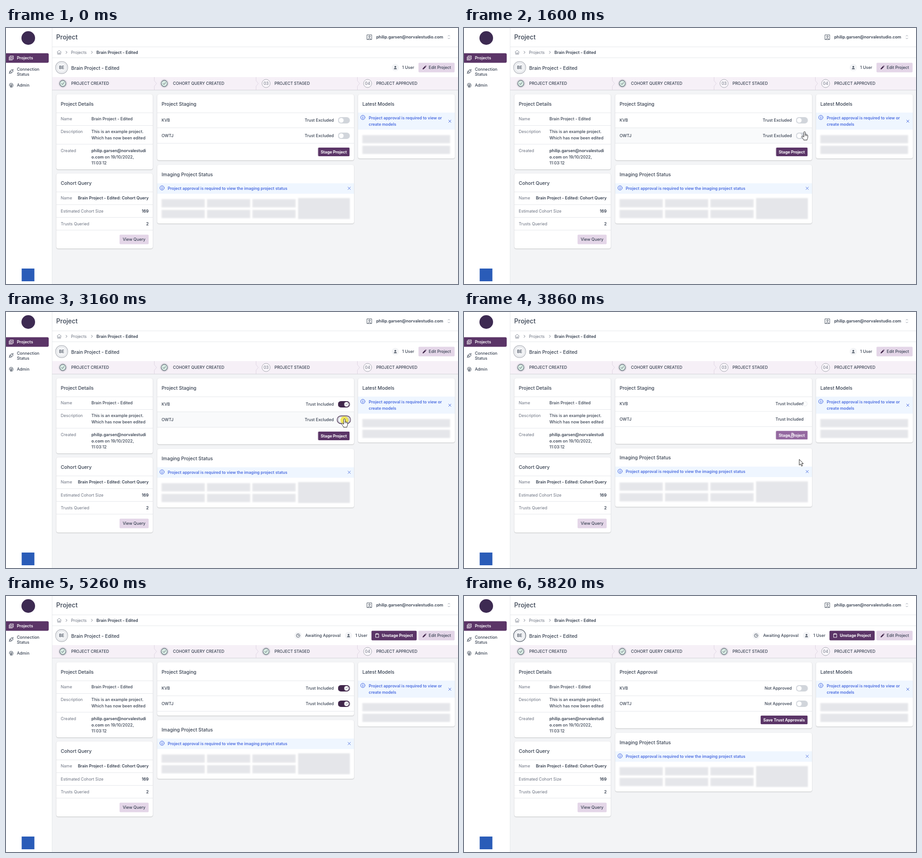
An HTML page that plays this animation: 995 px wide and 563 px high, repeating every 7740 ms.

```html
<!DOCTYPE html>
<html lang="en">
<head>
<meta charset="utf-8">
<title>Project</title>
<style>
html, body { margin: 0; width: 100%; height: 100%; overflow: hidden; background: #f3f4f6; }
#stage { position: relative; width: 995px; height: 563px; overflow: hidden; }
svg { position: absolute; left: 0; top: 0; display: block; }
text { font: 500 9px Inter, "Liberation Sans", sans-serif; fill: #374151; }
.h { font-size: 10.5px; }
.b { font-weight: 600; }
.g { fill: #6b7280; font-weight: 400; }
.step { font-size: 8.8px; }
.info { font-weight: 600; font-size: 8.85px; fill: #4a6ce0; }
.w { font-weight: 700; font-size: 8.8px; fill: #fff; }
.e { text-anchor: end; }
.m { text-anchor: middle; }
.line { stroke: #e5e7eb; fill: none; }
.ico { fill: none; stroke: #4b5563; stroke-linecap: round; stroke-linejoin: round; }
.bone { fill: #e5e6ea; filter: blur(1.5px); }
.main { fill: #5b3567; }
.soft { fill: #e4d6e8; }
.tint { fill: #eff6ff; }

.card { position: absolute; overflow: hidden; background: #fff; border-radius: 4px;
  box-shadow: 0 1px 2px rgba(0, 0, 0, .2), 0 0 1px rgba(0, 0, 0, .12); }

/* one timeline of 7.74 s for everything */
.t { animation: 7.74s step-end infinite; }
.slide { animation: 7.74s linear infinite; }

#staging { animation-name: fold; }
@keyframes fold {
  0%, 47.15% { height: 145px; }
  47.16%, 62.5% { height: 143.5px; }
  62.53% { height: 145px; animation-timing-function: ease-in-out; }
  66.54%, 68.2% { height: 117px; animation-timing-function: ease-in-out; }
  70.5%, 71% { height: 0; animation-timing-function: ease-in-out; }
  75.15%, 100% { height: 145px; }
}
#imaging { animation-name: follow; }
@keyframes follow {
  0%, 47.15% { transform: none; }
  47.16%, 62.5% { transform: translateY(-1.5px); }
  62.53% { transform: none; animation-timing-function: ease-in-out; }
  66.54%, 68.2% { transform: translateY(-28px); animation-timing-function: ease-in-out; }
  70.5%, 71% { transform: translateY(-145px); animation-timing-function: ease-in-out; }
  75.15%, 100% { transform: none; }
}

/* rows shrink a little while saving */
.nudge { animation-name: nudge; }
@keyframes nudge {
  0% { transform: none; }
  47.16% { transform: translateY(var(--d)); }
  62.53%, 100% { transform: none; }
}
.shift { animation-name: shift; }
@keyframes shift {
  0% { transform: none; }
  47.16% { transform: translateX(26px); }
  62.53%, 100% { transform: none; }
}
.idle { animation-name: idle; }
@keyframes idle { 0% { opacity: 1; } 47.16% { opacity: 0; } 62.53%, 100% { opacity: 1; } }
.busy { animation-name: busy; }
@keyframes busy { 0% { opacity: 0; } 47.16% { opacity: 1; } 62.53%, 100% { opacity: 0; } }
.spin { animation: spin .9675s linear infinite; }
@keyframes spin { to { transform: rotate(360deg); } }

/* before and after the approval card takes over */
.early { animation-name: early; }
@keyframes early { 0% { opacity: 1; } 70.6%, 100% { opacity: 0; } }
.late { animation-name: late; }
@keyframes late { 0% { opacity: 0; } 70.6%, 100% { opacity: 1; } }
/* before and after the project is staged */
.open { animation-name: open; }
@keyframes open { 0% { opacity: 1; } 62.53%, 100% { opacity: 0; } }
.staged { animation-name: staged; }
@keyframes staged { 0% { opacity: 0; } 62.53%, 100% { opacity: 1; } }

.out1 { animation-name: out1; }
@keyframes out1 { 0% { opacity: 1; } 33.72%, 100% { opacity: 0; } }
.in1 { animation-name: in1; }
@keyframes in1 { 0% { opacity: 0; } 33.72% { opacity: 1; } 70.6%, 100% { opacity: 0; } }
.out2 { animation-name: out2; }
@keyframes out2 { 0% { opacity: 1; } 41.73%, 100% { opacity: 0; } }
.in2 { animation-name: in2; }
@keyframes in2 { 0% { opacity: 0; } 41.73% { opacity: 1; } 70.6%, 100% { opacity: 0; } }

.track { fill: #d1d5db; }
.knob1 { animation-name: knob1; }
@keyframes knob1 {
  0%, 33.72% { transform: none; }
  35.5%, 70.5% { transform: translateX(11.5px); }
  70.6%, 100% { transform: none; }
}
.knob2 { animation-name: knob2; }
@keyframes knob2 {
  0%, 41.73% { transform: none; }
  43.5%, 70.5% { transform: translateX(11.5px); }
  70.6%, 100% { transform: none; }
}
.ring { fill: none; stroke: #40264a; stroke-width: 1.4; }
.ring1 { animation-name: ring1; }
@keyframes ring1 { 0% { opacity: 0; } 32.8% { opacity: 1; } 40.7%, 100% { opacity: 0; } }
.ring2 { animation-name: ring2; }
@keyframes ring2 { 0% { opacity: 0; } 40.7% { opacity: 1; } 45.35%, 100% { opacity: 0; } }
.hover { fill: #f9fafb; }
.hover1 { animation-name: hover1; }
@keyframes hover1 { 0% { opacity: 0; } 24.2% { opacity: 1; } 36.6%, 100% { opacity: 0; } }
.hover2 { animation-name: hover2; }
@keyframes hover2 {
  0% { opacity: 0; } 18.4% { opacity: 1; } 24.2% { opacity: 0; }
  36.6% { opacity: 1; } 44%, 100% { opacity: 0; }
}
.focus { animation-name: focus; }
@keyframes focus { 0% { stroke: #a9adb5; } 68.86%, 100% { stroke: #4b5563; } }

#cursor { animation-name: move; }
@keyframes move {
  0% { transform: translate(896px, 575px); }
  6.72% { transform: translate(896px, 575px); animation-timing-function: steps(6, start); }
  11.9% { transform: translate(812px, 366px); animation-timing-function: steps(5, start); }
  16.28% { transform: translate(759px, 264px); }
  17.18% { transform: translate(759px, 264px); animation-timing-function: steps(4, start); }
  20.65% { transform: translate(750px, 232px); animation-timing-function: steps(6, start); }
  26.61% { transform: translate(748px, 208px); }
  27.65% { transform: translate(748px, 208px); animation-timing-function: steps(2, start); }
  29.33% { transform: translate(744px, 202px); }
  35.3% { transform: translate(744px, 202px); animation-timing-function: steps(4, start); }
  38.89% { transform: translate(745px, 235px); }
  43% { transform: translate(745px, 235px); animation-timing-function: steps(3, start); }
  45.35% { transform: translate(722px, 270px); }
  47.9% { transform: translate(722px, 270px); animation-timing-function: steps(2, start); }
  49.85% { transform: translate(738px, 324px); animation-timing-function: step-end; }
  50.78% { transform: translate(767px, 352px); animation-timing-function: step-end; }
  51.68% { transform: translate(792px, 386px); animation-timing-function: steps(5, start); }
  56.1%, 100% { transform: translate(947px, 575px); }
}
.hand { animation-name: hand; }
@keyframes hand { 0% { opacity: 0; } 19.1% { opacity: 1; } 47.16%, 100% { opacity: 0; } }
.arrow { animation-name: arrow; }
@keyframes arrow { 0% { opacity: 1; } 19.1% { opacity: 0; } 47.16%, 100% { opacity: 1; } }
.click { animation-name: click; }
@keyframes click {
  0% { opacity: 0; } 32.8% { opacity: .8; } 34.6% { opacity: 0; }
  40.75% { opacity: .8; } 42.5% { opacity: 0; }
  45.35% { opacity: .8; } 46.9%, 100% { opacity: 0; }
}
</style>
</head>
<body>
<div id="stage">

<svg width="995" height="563">
  <defs>
    <g id="note" class="ico" style="stroke:#4a6ce0">
      <circle r="4.8" fill="#dbe6ff"/><path d="M0-.4V2.5M0-2.4V-2.2"/>
    </g>
    <path id="close" d="M-3-3L3 3M3-3L-3 3" fill="none" stroke="#4a6ce0"/>
    <g id="done">
      <circle r="9" fill="#f3f1f5" stroke="#cfcad4"/>
      <circle r="6.8" fill="#d8ebe3" stroke="#596270" stroke-width="1.2"/>
      <path class="ico" d="M-2.8.2L-.8 2.2 3-2.2"/>
    </g>
    <g id="person">
      <circle r="8" fill="#f3f4f6"/>
      <circle cy="-1.6" r="1.8" fill="#4b5563"/><path d="M-3.2 3.4C-3.2.2 3.2.2 3.2 3.4Z" fill="#4b5563"/>
    </g>
    <path id="split" d="M0 108V116L5 122 0 128V136" fill="none" stroke="#dfd6e3"/>
    <path id="arc" d="M0-5A5 5 0 1 1-5 0" fill="none" stroke-width="1.5" stroke-linecap="round"/>
  </defs>

  <rect width="101" height="563" fill="#fff"/>
  <rect x="101" width="894" height="108" fill="#fff"/>
  <rect x="101" y="108" width="894" height="28" fill="#f6f0f7"/>
  <path class="line" d="M101.5 0V563M101 41.5H995M101 65.5H995"/>
  <path d="M101 136.5H995" stroke="#d4d5da"/>

  <circle cx="49" cy="22" r="15" fill="#3d2a52"/>
  <rect x="34.5" y="529" width="28" height="28" fill="#2a5cb8"/>
  <path class="main" d="M0 55.5H91Q94 55.5 94 58.5V73.5Q94 76.5 91 76.5H0Z"/>
  <g class="ico" stroke-width="1.1">
    <path style="stroke:#fff" d="M9 61.5H16V68.5H9ZM7 63.5V70.5H14M10.8 64H14.2M10.8 66H14.2"/>
    <path d="M7 100L9 98M14 93L16 91M9.3 94.5L13 98.2C11.3 100 9.5 99.8 8.5 98.8 7.5 97.6 7.6 96 9.3 94.5ZM10.5 93.2C12 91.8 13.6 92 14.6 93 15.6 94 15.7 95.7 14.2 97"/>
    <path d="M7.5 127C7 123 9 121.5 11.5 121.5S16 123.5 15.5 128M9.2 129.5C10.5 127 8.8 124 11.5 124S13 128 12 130.5M11.5 126C11.5 128 11 129 10.5 130.5M14 130.2L14.4 129"/>
  </g>
  <text class="b" x="24" y="69" style="fill:#fff">Projects</text>
  <text x="24" y="94">Connection</text>
  <text x="24" y="105">Status</text>
  <text x="24" y="129">Admin</text>

  <text x="110.5" y="25" style="font-size:14px">Project</text>
  <g class="ico">
    <rect x="795" y="15" width="10" height="10.5"/><circle cx="800" cy="18.8" r="1.7"/><path d="M797 25C797 21.5 803 21.5 803 25"/>
    <path style="stroke:#9ca3af" d="M973 18L975 16 977 18M973 22L975 24 977 22"/>
    <path style="stroke:#8b919c" d="M112.5 53L117 49 121.5 53M113.5 52.5V57.5H120.5V52.5M116 57V54.5H118V57"/>
    <path style="stroke:#6b7280" d="M132 51L134.4 53.5 132 56M188 51L190.4 53.5 188 56"/>
  </g>
  <text class="b" x="815" y="23">philip.garsen@norvalestudio.com</text>
  <text class="g" x="143" y="56.5">Projects</text>
  <text class="b" x="199" y="56.5">Brain Project - Edited</text>

  <circle class="t focus" cx="122.5" cy="87" r="13.4" fill="#fff" stroke-width="1.2"/>
  <circle cx="122.5" cy="87" r="11" fill="#f3f4f6" stroke="#d1d5db"/>
  <text class="m" x="122.5" y="90.2">BE</text>
  <text class="h" x="143.5" y="91.5">Brain Project - Edited</text>

  <g class="t open">
    <use href="#person" x="857" y="87"/>
    <text x="872" y="90.2">1 User</text>
  </g>
  <g class="t staged">
    <circle cx="643" cy="87" r="8" fill="#f3f4f6"/>
    <g class="ico"><circle cx="643" cy="87" r="3.8"/><path d="M643 84.8V87.2H644.8"/></g>
    <text x="658.5" y="90.2">Awaiting Approval</text>
    <use href="#person" x="754" y="87"/>
    <text x="769" y="90.2">1 User</text>
    <rect class="main" x="804.5" y="76.5" width="99.5" height="21" rx="2"/>
    <path class="ico" style="stroke:#fff" d="M815 83.5H813.5V91H820.5V83.5H819M815.2 82.5H818.8V84.5H815.2Z"/>
    <text class="w m" x="861.5" y="90.2">Unstage Project</text>
  </g>
  <rect class="soft" x="908" y="76.5" width="79.5" height="21" rx="2"/>
  <path d="M917 91L917.6 88.5 922.6 83.5 924.5 85.4 919.5 90.4ZM923.2 82.9L924 82.2 925.8 84 925.1 84.8Z" fill="#40264a"/>
  <text class="m" x="955" y="90.2">Edit Project</text>

  <use href="#split" x="326.5"/><use href="#split" x="550.5"/><use href="#split" x="773.5"/>
  <use href="#done" x="125" y="122"/><use href="#done" x="348.5" y="122"/>
  <g class="t open">
    <circle cx="572.5" cy="122" r="9" fill="#faf7fb" stroke="#a4a6ae"/>
    <text class="g m" x="572.5" y="125.2">03</text>
  </g>
  <use class="t staged" href="#done" x="572.5" y="122"/>
  <circle cx="796" cy="122" r="9" fill="#faf7fb" stroke="#a4a6ae"/>
  <text class="g m" x="796" y="125.2">04</text>
  <text class="step" x="143.5" y="125.2">PROJECT CREATED</text>
  <text class="step" x="367.5" y="125.2">COHORT QUERY CREATED</text>
  <text class="step" x="591" y="125.2">PROJECT STAGED</text>
  <text class="step" x="815" y="125.2">PROJECT APPROVED</text>
</svg>

<div class="card" style="left:110.5px;top:146px;width:212.5px;height:165px">
  <svg width="212.5" height="165" viewBox="110.5 146 212.5 165">
    <path class="line" d="M110 186.5H324M110 214.5H324M110 255.5H324"/>
    <text class="h" x="120" y="170.5">Project Details</text>
    <text class="g" x="120" y="203.2">Name</text>
    <text x="187.5" y="203.2">Brain Project - Edited</text>
    <text class="g" x="120" y="231.2">Description</text>
    <text x="187.5" y="231.2">This is an example project.</text>
    <text x="187.5" y="244.8">Which has now been edited</text>
    <text class="g" x="120" y="272.7">Created</text>
    <text class="b" x="187.5" y="272.7">philip.garsen@norvalestudi</text>
    <text x="187.5" y="286.5"><tspan class="b">o.com</tspan> on 19/10/2022,</text>
    <text x="187.5" y="300.2">11:03:12</text>
  </svg>
</div>

<div class="card" style="left:110.5px;top:320px;width:212.5px;height:165px">
  <svg width="212.5" height="165" viewBox="110.5 320 212.5 165">
    <path class="line" d="M110 360.5H324M110 388.5H324M110 416.5H324M110 444.5H324"/>
    <text class="h" x="120" y="344.5">Cohort Query</text>
    <text class="g" x="120" y="377.2">Name</text>
    <text class="b e" x="313.5" y="377.2">Brain Project - Edited: Cohort Query</text>
    <text class="g" x="120" y="405.5">Estimated Cohort Size</text>
    <text class="b e" x="313.5" y="405.5">169</text>
    <text class="g" x="120" y="433.5">Trusts Queried</text>
    <text class="b e" x="313.5" y="433.5">2</text>
    <rect class="soft" x="249.5" y="454.5" width="64" height="21" rx="2"/>
    <text class="m" x="281.5" y="468.2">View Query</text>
  </svg>
</div>

<div class="card slide" id="staging" style="left:332.5px;top:146px;width:433px">
  <svg width="433" height="145" viewBox="332.5 146 433 145">
    <rect class="hover t hover1" x="332" y="187" width="434" height="32"/>
    <rect class="hover t hover2" x="332" y="220" width="434" height="33"/>
    <path class="line" d="M332 186.5H766"/>
    <text class="h t early" x="342" y="170.5">Project Staging</text>
    <text class="h t late" x="342" y="170.5">Project Approval</text>

    <g class="t nudge" style="--d:-.75px">
      <path class="line" d="M332 219.5H766"/>
      <text x="342" y="206.2">KVB</text>
      <g class="t shift">
        <text class="e t out1" x="721" y="206.2">Trust Excluded</text>
        <text class="e t in1" x="721" y="206.2">Trust Included</text>
        <text class="e t late" x="721" y="206.2">Not Approved</text>
      </g>
      <g class="t idle">
        <rect class="track" x="730" y="196" width="26.5" height="14" rx="7"/>
        <rect class="t in1" x="730" y="196" width="26.5" height="14" rx="7" fill="#40264a"/>
        <g class="slide knob1">
          <circle cx="737.5" cy="203" r="5.2" fill="#fff"/>
          <path class="ico t in1" d="M735.6 203.2L736.9 204.5 739.4 201.6"/>
        </g>
        <rect class="ring t ring1" x="728.5" y="194.5" width="29.5" height="17" rx="8.5"/>
      </g>
      <g class="t busy"><g transform="translate(750 202.5)"><use class="spin" href="#arc" stroke="#eeeff2"/></g></g>
    </g>

    <g class="t nudge" style="--d:-1.5px">
      <path class="line" d="M332 253.5H766"/>
      <text x="342" y="240">OWTJ</text>
      <g class="t shift">
        <text class="e t out2" x="721" y="240">Trust Excluded</text>
        <text class="e t in2" x="721" y="240">Trust Included</text>
        <text class="e t late" x="721" y="240">Not Approved</text>
      </g>
      <g class="t idle">
        <rect class="track" x="730" y="230" width="26.5" height="14" rx="7"/>
        <rect class="t in2" x="730" y="230" width="26.5" height="14" rx="7" fill="#40264a"/>
        <g class="slide knob2">
          <circle cx="737.5" cy="237" r="5.2" fill="#fff"/>
          <path class="ico t in2" d="M735.6 237.2L736.9 238.5 739.4 235.6"/>
        </g>
        <rect class="ring t ring2" x="728.5" y="228.5" width="29.5" height="17" rx="8.5"/>
      </g>

      <g class="t early">
        <rect class="main" x="686.5" y="263" width="69.5" height="19" rx="2"/>
        <rect class="t busy" x="686.5" y="263" width="69.5" height="19" rx="2" fill="#9468a0"/>
        <text class="w m" x="721" y="275.7">Stage Project</text>
        <g class="t busy"><g transform="translate(721 272.5)"><use class="spin" href="#arc" stroke="#eee4f1"/></g></g>
      </g>
      <g class="t late">
        <rect class="main" x="652.5" y="263" width="103.5" height="19" rx="2"/>
        <text class="w m" x="704" y="275.7">Save Trust Approvals</text>
      </g>
    </g>
  </svg>
</div>

<div class="card slide" id="imaging" style="left:332.5px;top:300.5px;width:433px;height:129px">
  <svg width="433" height="129" viewBox="332.5 300.5 433 129">
    <rect class="tint" x="332" y="341" width="434" height="23"/>
    <text class="h" x="342" y="325">Imaging Project Status</text>
    <use href="#note" x="343" y="351.2"/>
    <text class="info" x="355.5" y="355.2">Project approval is required to view the imaging project status</text>
    <use href="#close" x="755" y="352"/>
    <g class="bone">
      <rect x="342" y="376" width="95" height="18"/><rect x="442" y="376" width="95" height="18"/>
      <rect x="542" y="376" width="95" height="18"/><rect x="342" y="399.5" width="95" height="18"/>
      <rect x="442" y="399.5" width="95" height="18"/><rect x="542" y="399.5" width="95" height="18"/>
      <rect x="642.5" y="373.5" width="114" height="46"/>
    </g>
  </svg>
</div>

<div class="card" style="left:775px;top:146px;width:212.5px;height:140.5px">
  <svg width="212.5" height="140.5" viewBox="775 146 212.5 140.5">
    <rect class="tint" x="775" y="186" width="213" height="37.5"/>
    <text class="h" x="784.5" y="170.5">Latest Models</text>
    <use href="#note" x="785.5" y="196.7"/>
    <text class="info" x="798.5" y="201">Project approval is required to view or</text>
    <text class="info" x="798.5" y="214.8">create models</text>
    <use href="#close" x="977" y="205"/>
    <g class="bone">
      <rect x="784.5" y="235.5" width="193" height="18"/><rect x="784.5" y="259" width="193" height="18"/>
    </g>
  </svg>
</div>

<svg width="995" height="563">
  <g id="cursor" class="slide">
    <circle class="t click" cy="3" r="9" fill="#f2e53c"/>
    <path class="t arrow" d="M0 0V13L3 10.3 5.1 15 7.2 14.1 5.2 9.5H9Z" fill="#fff" stroke="#222" stroke-linejoin="round"/>
    <g class="t hand" stroke="#222" stroke-linejoin="round">
      <path d="M-1.7 1.4C-1.7-.5 1.6-.5 1.6 1.4V6.4C2.8 5.8 4.1 6.2 4.3 7.3 5.8 6.8 7 7.5 7 9V12.4C7 15 5.4 16 5.4 18.4H-2C-2 16.4-5.8 13-6 11-6.1 9.5-4.4 9.2-3.4 10.2L-1.7 12Z" fill="#fff"/>
      <path d="M1.6 6.4V9.5M4.3 7.3V9.8" fill="none"/>
    </g>
  </g>
</svg>

</div>
</body>
</html>
```
